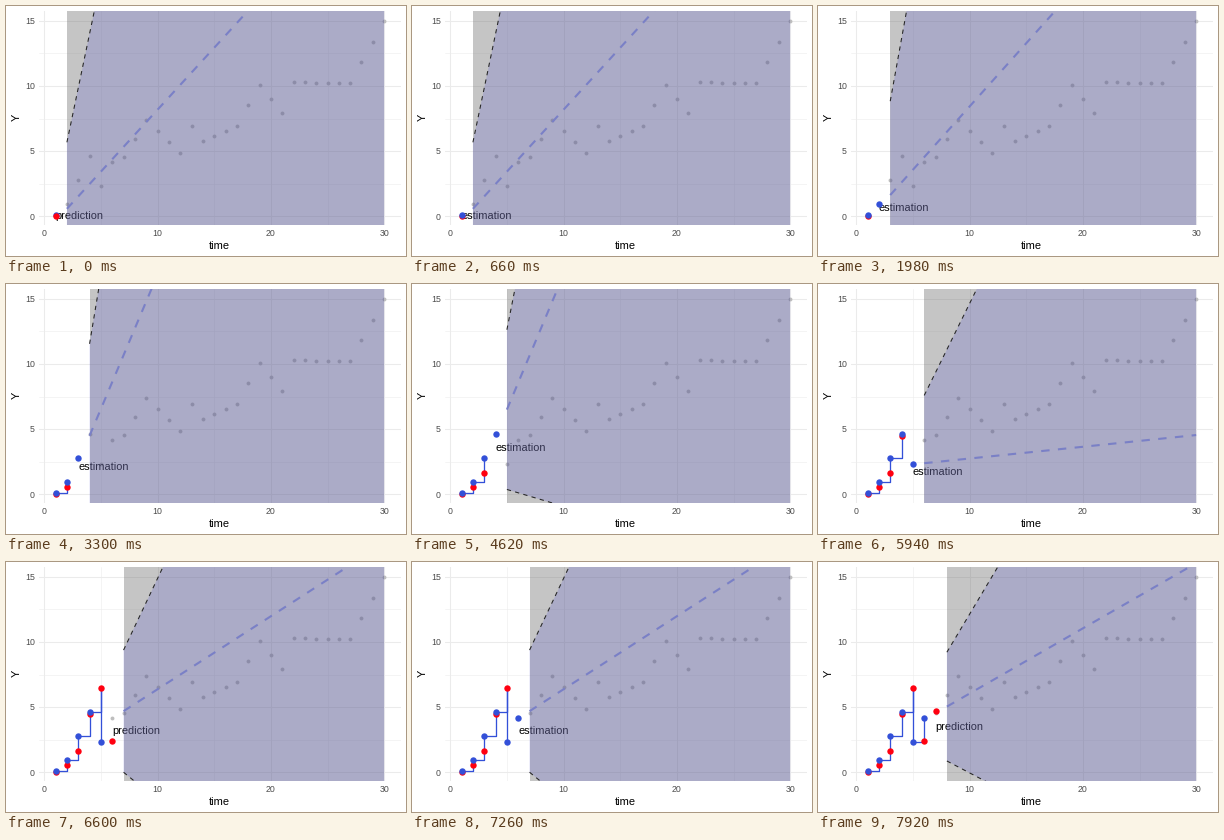
Recreate the animation shown at these times as a matplotlib script. Size 400x250 px, loop 8000 ms.

```python
import numpy as np
import matplotlib.pyplot as plt
from matplotlib.animation import FuncAnimation

W, H, DPI = 400, 250, 100
PX = 72 / DPI  # points per pixel
LOOP, TICK, HOLD = 8000, 20, 660
LEFT, RIGHT, TOP, BOTTOM = 33, 394.5, 5, 218.5
X0, X_UNIT = 38.25, 11.33
Y0, Y_UNIT = 210.3, 13.04

BLUE, RED, GRID = "#3350d8", "#ff0010", "#ebebeb"
DASHED = (0, (4, 4))

# The series runs straight between its turning points.
LAST = 30
TURNS = [(1, 0.1), (2, 0.95), (4, 4.65), (5, 2.3), (6, 4.15), (7, 4.55),
         (9, 7.35), (12, 4.85), (13, 6.95), (14, 5.8), (17, 6.95),
         (19, 10.1), (21, 7.9), (22, 10.3), (27, 10.2), (30, 15)]
TIMES = np.arange(1, LAST + 1)
OBSERVED = np.interp(TIMES, *zip(*TURNS))

# Each forecast starts at the newest observation plus its damped trend.
TREND = np.array([0.95, 0.97, 2.06, 2.07, 0.09, 0.56, 0.5])
STEPS = np.arange(len(TREND))
NEXT = OBSERVED[STEPS] + TREND * (1 - 0.5 * 0.6 ** STEPS)
PREDICTED = np.r_[0, NEXT]


def x_at(px):
    return (px - X0) / X_UNIT


def y_at(py):
    return (Y0 - py) / Y_UNIT


def forecast(k):
    """Mean line and the half-width of its symmetric, widening band."""
    x = np.array([k + 1, LAST])
    ahead = x - x[0]
    spread = np.interp(k, [1, 2, 3, 5, 7], [5.1, 7.2, 7.05, 5.2, 4.17])
    growth = 0.63 * 0.845 ** (k - 1)
    return x, NEXT[k - 1] + TREND[k - 1] * ahead, spread * (1 + growth * ahead)


def step_path(count):
    """Hold each estimate, jump to the prediction, then correct it."""
    xs, ys = [1], [OBSERVED[0]]
    for i in range(1, count):
        xs += [i + 1] * 3
        ys += [OBSERVED[i - 1], PREDICTED[i], OBSERVED[i]]
    return xs, ys


plt.rcParams["font.family"] = "Liberation Sans"
fig = plt.figure(figsize=(W / DPI, H / DPI), dpi=DPI, facecolor="white")
ax = fig.add_axes([LEFT / W, 1 - BOTTOM / H,
                   (RIGHT - LEFT) / W, (BOTTOM - TOP) / H])
ax.set_xlim(x_at(LEFT), x_at(RIGHT))
ax.set_ylim(y_at(BOTTOM), y_at(TOP))
ax.axis("off")

for v in range(0, 31, 5):
    ax.axvline(v, color=GRID, lw=(0.5 if v % 10 else 1.07) * PX, zorder=0)
for v in np.arange(0, 15.1, 2.5):
    ax.axhline(v, color=GRID, lw=(0.5 if v % 5 else 1.07) * PX, zorder=0)

tick_style = dict(color="#4d4d4d", fontsize=8.8 * PX, va="baseline")
title_style = dict(color="black", fontsize=11 * PX, ha="center")
for v in range(0, 31, 10):
    ax.text(v, y_at(230), str(v), ha="center", **tick_style)
for v in range(0, 16, 5):
    ax.text(x_at(28.8), v - 3.2 / Y_UNIT, str(v), ha="right", **tick_style)
ax.text(x_at(213.6), y_at(243), "time", va="baseline", **title_style)
ax.text(x_at(11), y_at(111.6), "Y", rotation=90, va="center", **title_style)


def dots(color, size, zorder):
    return ax.plot([], [], "o", color=color, ms=size * PX, mew=0,
                   snap=False, zorder=zorder)[0]


def line(color, width, zorder, style="-"):
    return ax.plot([], [], color=color, lw=width * PX, ls=style,
                   dash_capstyle="butt", zorder=zorder)[0]


future = dots("#bebebe", 3.9, 1)
label = ax.text(0, 0, "", color="black", fontsize=11 * PX,
                ha="left", va="baseline", zorder=2)
shade = ax.axvspan(0, LAST, facecolor="#707070", alpha=0.4, lw=0, zorder=3)
band = ax.fill([0, 1, 1], [0, 0, 1], color="#4646d1", alpha=0.2, lw=0,
               zorder=4)[0]
upper_line = line("#262626", 1.07, 5, DASHED)
lower_line = line("#262626", 1.07, 5, DASHED)
mean_line = line("#7a80c6", 2.1, 5, DASHED)
path = line(BLUE, 1.3, 6)
predictions = dots(RED, 6.4, 7)
estimates = dots(BLUE, 6.4, 8)


def show_forecast(k):
    x, mean, half = forecast(k)
    mean_line.set_data(x, mean)
    upper_line.set_data(x, mean + half)
    lower_line.set_data(x, mean - half)
    band.set_xy(np.c_[np.r_[x, x[::-1]],
                      np.r_[mean + half, (mean - half)[::-1]]])
    shade.set_x(k + 1)
    shade.set_width(LAST - k - 1)


def update(frame):
    step = frame * TICK // HOLD
    k, estimating = step // 2 + 1, step % 2 == 1
    n_pred = max(1, k - estimating)
    n_est = max(1, k - 1 + estimating)

    show_forecast(k)
    future.set_data(TIMES[k - 1:], OBSERVED[k - 1:])
    predictions.set_data(TIMES[:n_pred], PREDICTED[:n_pred])
    estimates.set_data(TIMES[:n_est], OBSERVED[:n_est])
    estimates.set_zorder(8 if step else 6.5)
    path.set_data(*step_path(k - 1))
    label.set_text("estimation" if estimating else "prediction")
    label.set_position((k, 0.78 * OBSERVED[k - 1] - 4.2 / Y_UNIT))


anim = FuncAnimation(fig, update, frames=LOOP // TICK, interval=TICK,
                     init_func=lambda: update(0), repeat=True, repeat_delay=0)
plt.show()
```
